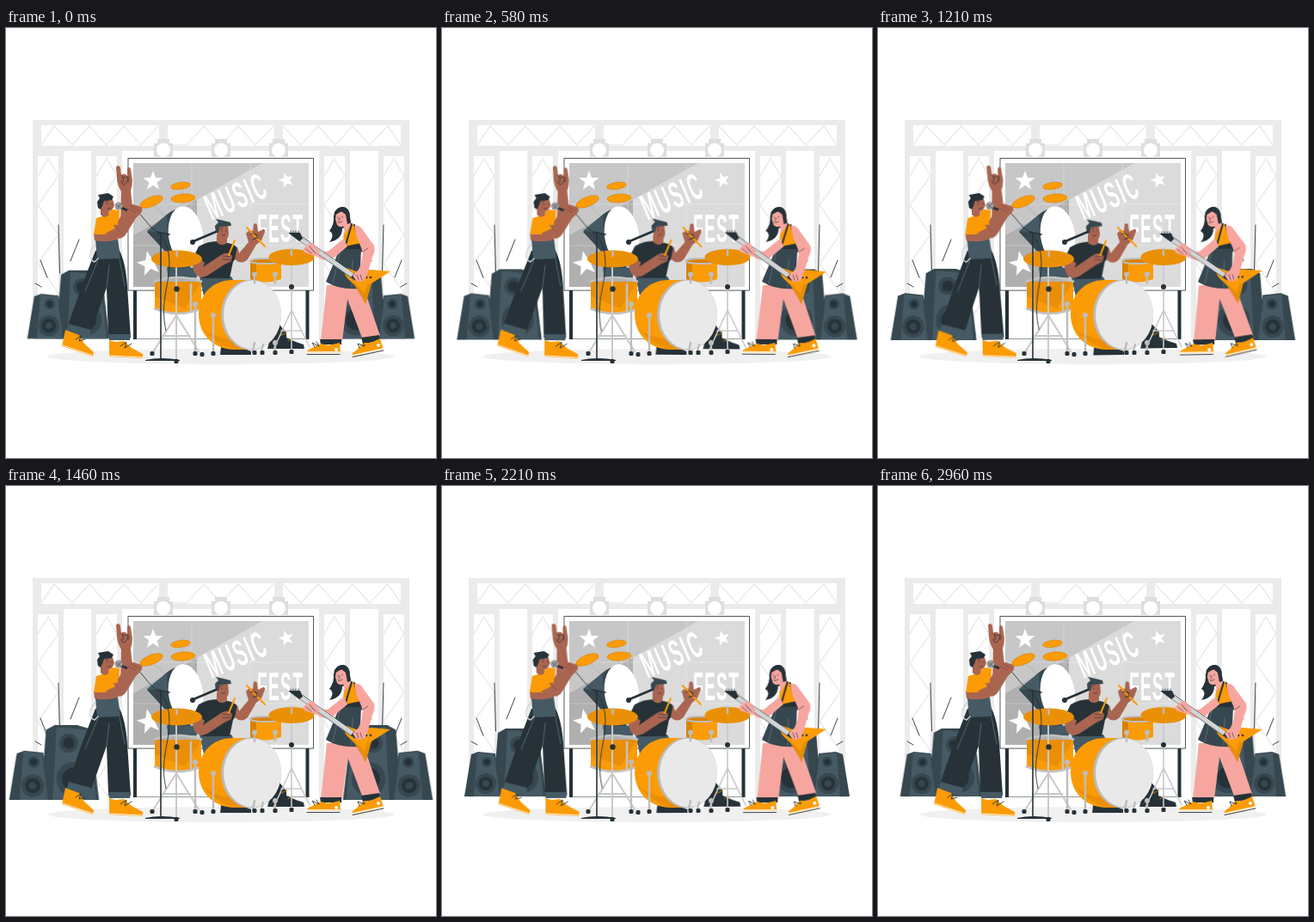
Write an HTML page without scripts that moves like this. It is 500 px wide and 500 px high and loops after 3 s.

```html
<!DOCTYPE html>
<html lang="en">
<head>
<meta charset="utf-8">
<title>Music Fest</title>
<style>
html, body { margin: 0; width: 100%; height: 100%; overflow: hidden; background: #fff; }
svg { display: block; width: 100%; height: 100%; }
.o { fill: #fb9b06; } .od { fill: #d98205; } .c { fill: #ea9006; }
.k { fill: #263238; } .d { fill: #37474f; } .b { fill: #455a64; }
.g { fill: #ebebeb; } .m { fill: #bdbdbd; } .w { fill: #fff; }
.s { fill: #aa6550; } .p { fill: #f6a69f; }
.l { fill: none; stroke: #263238; stroke-width: .9; stroke-linecap: round; stroke-linejoin: round; }
.t { fill: none; stroke: #ebebeb; stroke-width: 1.5; }
.rod { fill: none; stroke: #bdbdbd; stroke-width: 2.4; stroke-linecap: round; }
.leg { fill: none; stroke: #c9c9c9; stroke-width: 1.6; stroke-linecap: round; }
.title { fill: #fff; font-family: "Liberation Sans", Arial, sans-serif; font-weight: 700; }
.beat { transform-origin: 250px 322px; animation: beat 3s ease-in-out -80ms infinite; }
.sway { animation: sway 1.5s ease -1440ms infinite; }
#singer { transform-origin: 112px 272px; }
#drummer { transform-origin: 283px 301px; }
#guitarist { transform-origin: 388px 295px; }
@keyframes beat {
  0%, 26.67%, 35%, 61.67%, 100% { transform: scale(1); }
  16%, 51% { transform: scale(1.1); }
}
@keyframes sway {
  0%, 100% { transform: rotate(0deg); }
  25% { transform: rotate(1deg); }
  75% { transform: rotate(-1deg); }
}
</style>
</head>
<body>
<svg viewBox="0 0 500 500">
<defs>
  <g id="column">
    <path class="g" d="M0 143h36v6H0zM0 143h6v219H0zM30 143h6v219h-6z"/>
    <path class="t" d="M6 172 18 152 30 172 6 206 30 240 6 274 30 308 6 342 20 362"/>
  </g>
  <g id="lamp">
    <path fill="#dedede" d="M-7-13H7v5h4v16h-22V-8h4z"/>
    <circle r="8" class="w"/>
  </g>
  <path id="star" class="w" d="M0-12 3-4 11.5-3.7 4.8 1.6 7 9.7 0 5-7 9.7-4.8 1.6-11.5-3.7-3-4z"/>
  <g id="stack">
    <path class="d" d="M59 361 65 287 74 282 98 282 112 286 121 361z"/>
    <path class="b" d="M76 284 110 287 118 361H72z"/>
    <circle class="d" cx="89" cy="301" r="10"/><circle class="k" cx="89" cy="301" r="6"/>
    <circle class="d" cx="94" cy="339" r="18"/><circle class="k" cx="94" cy="339" r="12"/>
    <path class="d" d="M26 361 34 312 42 309 62 311 70 361z"/>
    <path class="b" d="M41 310 61 312 67 361H37z"/>
    <circle class="d" cx="52" cy="321" r="6"/><circle class="k" cx="52" cy="321" r="3.6"/>
    <circle class="d" cx="51" cy="346" r="12"/><circle class="k" cx="51" cy="346" r="8"/>
    <circle class="d" cx="51" cy="346" r="4"/>
  </g>
  <path id="side" class="l" d="M61 229 62.500 285M75 271 85 246M40 270 48 290M34 297 41 301"/>
  <g id="lug"><circle class="m" r="3"/><path class="rod" d="M0 0v10"/></g>
  <rect id="foot" class="k" x="-2.500" y="-2" width="5" height="5" rx="1.500"/>
</defs>

<!-- stage frame -->
<path class="g" d="M31 107H469V143H459V113H41V143H31zM41 137H459V143H41zM178 113h10v20h-10zM312 113h10v20h-10z"/>
<path class="t" d="M41 136 56 114 77 136 97 114 117 136 137 114 157 136 177 114M189 136 210 136 230 114 250 136 270 114 290 136 311 114M322 114 343 136 363 114 383 136 403 114 423 136 444 114 459 136"/>
<use href="#column" x="31"/><use href="#column" x="99"/>
<use href="#column" x="364"/><use href="#column" x="433"/>

<!-- screen -->
<path class="k" d="M148 305h4v57h-4zM348.500 305h4v57h-4z"/>
<path class="l" style="stroke-width:.5" d="M150 361.500H350"/>
<rect class="w" x="142" y="151.600" width="215.500" height="153.500" stroke="#263238" stroke-width=".8"/>
<rect x="148" y="157" width="204" height="144" fill="#dbdbdb"/>
<path fill="#c7c7c7" d="M148 157H298L148 241z"/>
<path fill="#b0b0b0" d="M148 241 222 199.500V301H148z"/>
<path stroke="#fff" stroke-opacity=".25" d="M216 157V301M284 157V301M148 205H352M148 253H352"/>
<use href="#star" transform="translate(171 178)"/>
<use href="#star" transform="translate(326 177) rotate(-16) scale(.78)"/>
<use href="#star" transform="translate(167 274) rotate(-12) scale(1.25)"/>
<text class="title" transform="translate(239 224) rotate(-23) scale(.47 1)" font-size="43" letter-spacing="4">MUSIC</text>
<text class="title" transform="translate(292 248.500) scale(.41 1)" font-size="47" letter-spacing="3">FEST</text>
<use href="#lamp" transform="translate(183 142)"/>
<use href="#lamp" transform="translate(250 142)"/>
<use href="#lamp" transform="translate(317 142)"/>

<ellipse cx="250" cy="382" rx="202" ry="9" fill="#f0f0f0"/>
<use href="#side"/><use href="#side" transform="matrix(-1 0 0 1 500 0)"/>
<g class="beat">
  <use href="#stack"/><use href="#stack" transform="matrix(-1 0 0 1 500 0)"/>
</g>

<!-- rear of the kit -->
<path class="rod" style="stroke-width:1.600" d="M204 177 206 232M169 203 190 224"/>
<path class="d" d="M164 237 187 217Q195 210 206 209L196 250 222 290H188L187 262z"/>
<ellipse class="w" cx="209" cy="241" rx="20" ry="34" transform="rotate(-8 209 241)"/>
<g class="o" stroke="#d98205" stroke-width=".6">
  <ellipse cx="203" cy="183.500" rx="11.500" ry="4" transform="rotate(-8 203 184)"/>
  <ellipse cx="206" cy="198" rx="14" ry="5" transform="rotate(-4 206 198)"/>
  <ellipse cx="169" cy="202" rx="14" ry="5.500" transform="rotate(-22 169 202)"/>
</g>
<path class="b" d="M187 279H222V290H189z"/>

<g id="drummer" class="sway">
  <path class="k" d="M308 357 317 344 326 354 326 360 337 365 346 368 347 373H304z"/>
  <path class="l" style="stroke:#fb9b06;stroke-width:.7" d="M318 358 327 354M328 364 333 360"/>
  <path class="k" d="M250 371H272L285 376V380H249z"/>
  <path class="b" d="M225 289H262L268 300 230 312z"/>
  <path class="k" d="M224 254Q234 248 245 248L258 250Q269 251 271 262L264 272 260 291H228L229 274 219 264z"/>
  <path class="s" d="M245 240 257 242 257 250Q250 255 245 249z"/>
  <path class="s" d="M246 230 258 230 259 238Q259 246 254 246 248 246 245 238z"/>
  <path class="d" d="M244 238 243 230 247 226 244 222 253 224 261 226 262 230 249 231 247 238z"/>
  <path class="l" style="stroke-width:.7" d="M251 235v1M256 235v1M251 241q3 1 4-1M250 233l2-1"/>
  <path class="s" d="M221 264 231 273 229 278 250 264Q258 259 263 265L262 271 254 275 234 288Q224 293 219 284 215 274 221 264z"/>
  <path class="l" style="stroke-width:.6" d="M252 265 261 266M252 269 261 269.500"/>
  <path stroke="#fb9b06" stroke-width="2" stroke-linecap="round" d="M266 247 259 264"/>
  <path class="s" d="M269 254 271 262 282 249 279 239Q282 234 287 236L288 228Q291 226 292 229L293 237 299 234Q302 234 301 237L297 247 291 252 281 269Q274 276 266 269z"/>
  <path stroke="#fb9b06" stroke-width="2" stroke-linecap="round" d="M280 232 301 254"/>
  <path class="l" style="stroke-width:.7" d="M284 240q5-3 7 1t-4 5M289 240l4 1M289 245l5-1"/>
</g>
<path class="l" style="stroke-width:2.800" d="M218 248 244 237"/>
<circle class="k" cx="217" cy="249" r="3"/>

<!-- front of the kit -->
<path class="leg" d="M332 272V376M332 328 311 374M332 328 353 371M320 352h24"/>
<g class="o">
  <path d="M284 272H320V292Q302 299 284 292z"/>
  <path class="od" d="M284 272H291V296L284 292z"/>
  <ellipse class="od" cx="302" cy="271" rx="18" ry="3" stroke="#bdbdbd" stroke-width="2"/>
  <ellipse class="c" cx="332" cy="266.500" rx="26.500" ry="9.500"/>
</g>
<circle class="k" cx="332" cy="301" r="3"/><path class="rod" d="M332 257v7"/>
<g class="o">
  <path d="M173 295H227V327Q200 338 173 327z"/>
  <path class="od" d="M173 295H227L208 326 173 312z" opacity=".5"/>
  <path fill="none" stroke="#c2c2c2" stroke-width="2.500" d="M172 295Q200 285 228 295M172 326Q200 338 228 326M180 297V329M215 297V329"/>
</g>
<path class="leg" d="M198 275V387M198 334 171 377M198 334 224 376M182 358h32" style="stroke-width:2"/>
<circle class="k" cx="198.500" cy="303.500" r="3.200"/>
<ellipse class="c" cx="198.500" cy="268.500" rx="29.500" ry="10"/>
<path class="rod" d="M198.500 259v6"/>

<path class="o" d="M284 293H264C239 293 224 311 224 333S240 373 264 374H284z"/>
<path class="od" d="M227 348Q242 366 264 374H284V362Q246 365 227 348z" opacity=".45"/>
<ellipse cx="285" cy="333.500" rx="35" ry="41" fill="#bababa"/>
<ellipse cx="286.500" cy="333.500" rx="33.500" ry="40" fill="#e9e9e9"/>
<use href="#lug" x="289" y="286.500"/><use href="#lug" x="313" y="286.500"/>
<path class="rod" d="M220 321V378M241 334V378M289 366 287 376M299 368 297 376M313 364V376"/>
<circle class="m" cx="220" cy="321" r="3"/><circle class="m" cx="241" cy="334" r="3"/>
<circle class="m" cx="313" cy="366" r="3"/>
<use href="#foot" x="170" y="378"/><use href="#foot" x="198" y="387"/><use href="#foot" x="220" y="378"/>
<use href="#foot" x="228" y="379"/><use href="#foot" x="241" y="378"/><use href="#foot" x="289" y="377"/>
<use href="#foot" x="298" y="377"/><use href="#foot" x="313" y="377"/><use href="#foot" x="332" y="376"/>

<!-- microphone stand -->
<path class="b" d="M164 236 187 217 188 239z"/>
<path class="l" style="stroke-width:1.600" d="M180 238V385M176 237 190 240"/>
<path class="k" d="M162 386Q180 382 202 386V387H162z"/>

<g id="singer" class="sway">
  <path class="l" d="M150 212C160 218 163 228 174 236 194 250 191 280 187 300 182 325 183 337 186 352"/>
  <path class="k" d="M104 259 131 257Q139 271 141 300L145 360H119L117 302 99 353 72 346 88 300z"/>
  <path class="b" d="M104 247 130 245 133 268 106 269z"/>
  <path class="b" d="M73 344 99 351 96 360 70 353zM119 356H145L144 363H120z"/>
  <path class="l" style="stroke:#607d8b;stroke-width:.7" d="M117 302 120 276M132 269 138 300M107 270 92 306"/>
  <path class="l" style="stroke:#cfd8dc;stroke-width:1.300" d="M104 251C96 259 96 270 103 272L107 268"/>
  <path class="o" d="M69 351 77 354 85 357 91 367 102 377 101 382 65 370z"/>
  <path class="o" d="M120 363 127 365 137 364 146 372 159 379V384L120 382z"/>
  <path class="l" style="stroke:#fff" d="M65.500 369 101 381M120 381 159 383"/>
  <path class="l" d="M81 362 87 358 85 364 92 362M133 370 140 365 138 372 146 367"/>
  <path class="s" d="M102 239 130 239 130 246Q116 250 103 247z"/>
  <path class="s" d="M133 234 134 190Q129 182 129 174L128 162Q130 158 133 162L134 171Q138 168 141 172L141 164Q143 160 145 164L147 177Q147 184 145 189L147 207 139 233z"/>
  <path class="l" style="stroke-width:.7" d="M134 171q4 4 2 8M136 174q7-3 6 3l-4 5q-4 0-4-4M142 173v6"/>
  <path class="o" d="M105 221 115 218 124 211 132 212 131 240H102z"/>
  <path class="s" d="M110 209 120 211 119 218Q114 222 110 217z"/>
  <path class="s" d="M110 199 124 199 126 206Q124 213 118 214 111 213 108 206z"/>
  <path class="k" d="M107 209 106 202 109 198 107 194 119 192 125 196 123 200 114 201 112 207 110 211z"/>
  <path class="l" style="stroke-width:.7" d="M118 204v1M123 204v1M118 210q3 1 4-1M116 202l3-1"/>
  <path class="s" d="M115 229 130 229 130 225 138 211Q141 205 148 205L157 208Q160 211 157 215L151 221 140 239Q135 247 127 244L113 238z"/>
  <path class="o" d="M106 221 121 222 127 233 115 239 104 235z"/>
  <path class="l" style="stroke-width:.6;stroke:#7c4236" d="M142 210 151 214M145 207 154 212M128 232 133 237"/>
  <path stroke="#263238" stroke-width="3" d="M132 208 141 212"/>
  <circle cx="131" cy="207" r="4.600" fill="#9e9e9e"/>
  <path class="l" style="stroke-width:.5" d="M128 205 134 210M129 210 134 204"/>
</g>

<g id="guitarist" class="sway">
  <path class="k" d="M382 214Q386 207 393 208 400 210 400 220L402 231 391 233Q391 246 376 249 383 240 376 236 382 228 381 219z"/>
  <path class="p" d="M391 224 399 224 403 232 394 239z"/>
  <path class="p" d="M384 215 396 212Q399 221 396 228 390 234 385 229L383 222z"/>
  <path class="k" d="M382 218Q384 208 392 208 401 210 400 227L397 228 395 217 390 213z"/>
  <path class="l" style="stroke-width:.7" d="M386 220v1M391 219v1M386 226q3 1 5-1M388 221l-1 3"/>
  <path class="p" d="M373 299 399 299 391 364H366zM391 299 414 296 435 358 415 363z"/>
  <path class="k" d="M365 362H390V368H366zM413 360 434 357 435 364 415 367z"/>
  <path class="o" d="M366 367 375 369 388 366 389 378H350Q349 374 356 372z"/>
  <path class="o" d="M416 366 424 366 435 361 439 374 404 382Q400 379 407 375z"/>
  <path class="l" style="stroke:#fff;stroke-width:1.700" d="M350 377H388M403 381 439 373"/>
  <circle class="w" cx="384" cy="374" r="2"/><circle class="w" cx="433" cy="369" r="2"/>
  <path class="l" d="M350 379.500H388M403 382.500 439 375M359 371 356 366 364 370 361 365M411 372 409 367 417 370 415 365"/>
  <path class="p" d="M393 237 403 229 413 233 415 261H391z"/>
  <path class="o" d="M393 240 402 228 405 229 407 238 413 242 414 260H391z"/>
  <path class="k" d="M394 254 413 250 414 260H391z"/>
  <path class="l" style="stroke-width:2" d="M395 252 402 228M412 250 405 229"/>
  <path class="d" d="M388 257H413L411 303Q388 305 372 295z"/>
  <path class="l" style="stroke:#607d8b;stroke-width:.7" d="M388 262 380 297M403 270 402 302"/>
  <path class="p" d="M393 245 397 254 379 269Q370 272 362 266L347 261Q344 257 349 254L358 251 365 259 374 260z"/>
  <path class="o" d="M396 279 410 284 424 281 447 283 425 297 418 321Q414 306 397 291 391 284 396 279z"/>
  <path class="od" d="M400 291 418 321 425 297 420 298 417 309z" opacity=".6"/>
  <path stroke="#455a64" stroke-width="6" d="M340 243 407 291"/>
  <path stroke="#e5e5e5" stroke-width="5" d="M341 244 406 290"/>
  <path stroke="#9e9e9e" stroke-width=".6" d="M341 243 407 290M340 245 406 291.500"/>
  <path class="k" d="M328 238 342 238 345 245 341 248z"/>
  <path class="l" d="M331 238v-2M334 238v-2M337 238v-2M340 238v-2"/>
  <path class="k" d="M404 286 412 291 409 295 401 290z"/>
  <circle class="k" cx="419" cy="290" r="1.300"/><circle class="k" cx="424" cy="290" r="1.300"/>
  <path class="p" d="M350 252 357 250 365 260 361 264 357 262 360 258 353 257 346 261z"/>
  <path class="l" style="stroke-width:.6" d="M349 257 355 262M353 254 360 262"/>
  <path class="p" d="M405 230Q412 229 415 235L428 253Q430 259 426 266L421 284 417 294 408 295 403 288 410 281 413 274 415 260 408 244z"/>
  <path class="l" style="stroke-width:.6" d="M408 287 410 293M412 287 414 293M415 260 421 256"/>
</g>
</svg>
</body>
</html>
```
